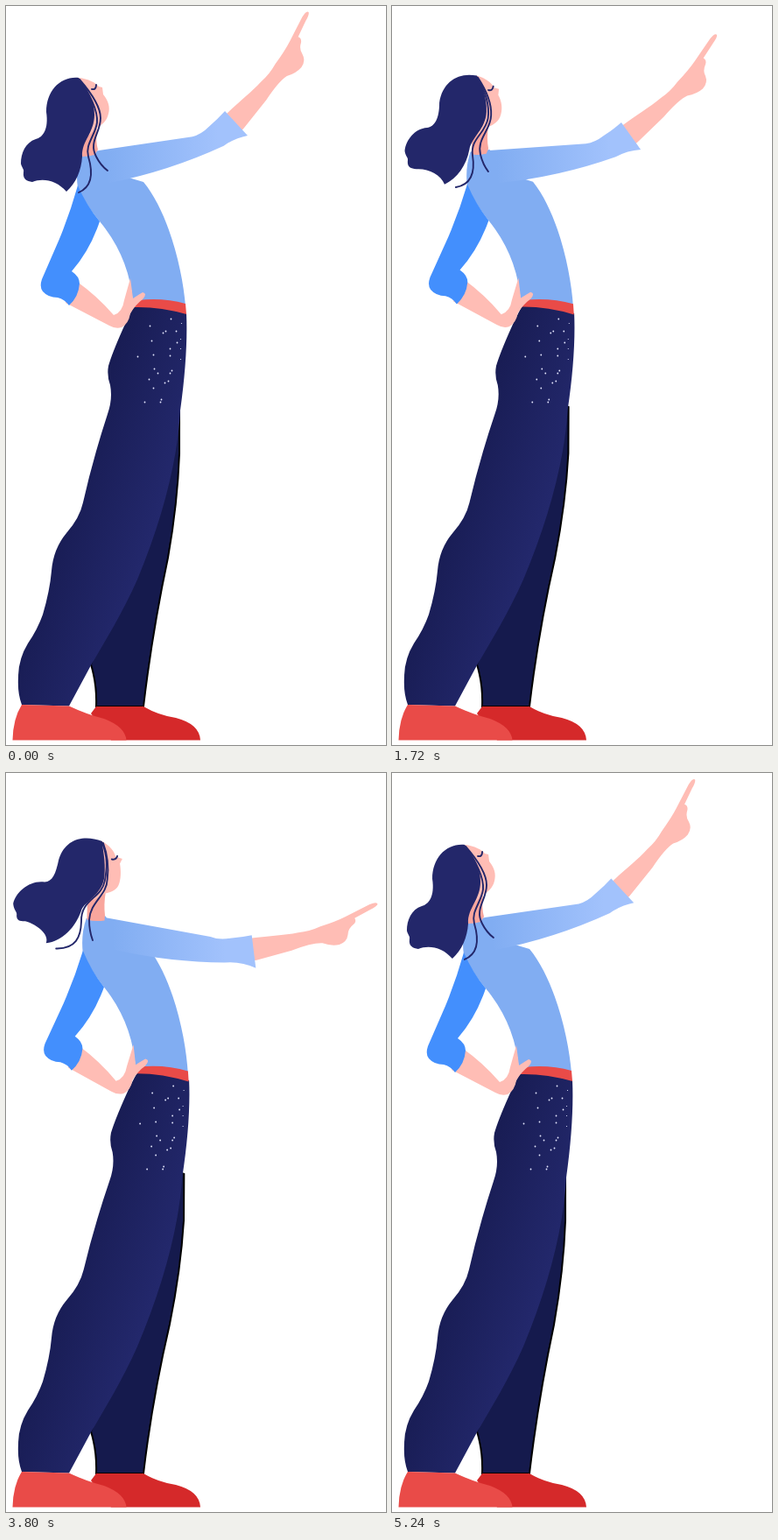
Animation, 434 px wide and 844 px high, one loop 5.28 s. Source, as an HTML page:

```html
<!DOCTYPE html>
<html lang="en">
<head>
<meta charset="utf-8">
<title>Pointing woman</title>
<style>
  html, body { margin: 0; width: 100%; height: 100%; overflow: hidden; background: #fff; }
  svg { display: block; width: 434px; height: 844px; }
  .navy { fill: #23276a; }
  .line { fill: none; stroke: #23276a; stroke-width: 1.9; stroke-linecap: round; }
  .skin { fill: #ffbdb5; }
  .red { fill: #e94b48; }
</style>
</head>
<body>
<svg viewBox="0 0 434 844">
  <defs>
    <linearGradient id="cloth" gradientUnits="userSpaceOnUse" x1="65" y1="560" x2="172" y2="595">
      <stop offset="0" stop-color="#181c53"/>
      <stop offset="1" stop-color="#23286c"/>
    </linearGradient>
    <linearGradient id="sleeveTone">
      <stop offset="0.05" stop-color="#81adf2"/>
      <stop offset="0.8" stop-color="#a2c2fc"/>
    </linearGradient>
  </defs>

  <path id="backLeg" fill="#151a4d" stroke="#000" stroke-width="2"/>
  <path id="frontLeg" fill="url(#cloth)"/>
  <g id="dots" fill="#e6e8ff"></g>
  <path fill="#d5292a" d="M103,800 L157,800 Q174,810 194,813 Q221,820 222,838.500 L120,838.500 L97,808 Z"/>
  <path class="red" d="M18,798 Q8,814 7.500,838.500 L137.500,838.500 Q136,823 112,814 Q92,809 72,799.500 Z"/>

  <g id="torso">
    <path fill="#81adf2" d="M85,168 Q79,187 82,208 Q92,228 107,246 Q141,287 145,339 L205,343 C202,303 186,236 157,201 L120,190 L107,165 Z"/>
    <path class="red" d="M151,336 Q180,333 205,340 L206,352 Q175,343 145,344 Q147,338 151,336 Z"/>
    <path class="skin" d="M80,314 Q104,331 123,353 Q133,350 135,336 L142,311 L145,334 Q151,330 156,327 Q162,328 156,335 Q148,341 142,351 Q140,363 132,367 Q125,369 118,365 L68,339 Z"/>
    <path fill="#438ffd" d="M82,205 Q73,237 61,266 L41,312 Q38,321 42,326 Q48,333 59,333 Q67,335 72,342 Q83,332 84,317 Q84,309 75,303 Q96,279 107,246 Q92,228 82,205 Z"/>
  </g>

  <path id="hand" class="skin"/>
  <path id="sleeve" fill="url(#sleeveTone)"/>

  <g id="head">
    <path id="neck" fill="#f9a69d"/>
    <path id="face" class="skin"/>
    <path id="hair" class="navy"/>
    <path id="strandA" class="line"/>
    <path id="strandB" class="line"/>
    <path id="lash" class="line"/>
  </g>
</svg>
<script>
const LOOP = 5280, STEP = 40;
const $ = id => document.getElementById(id);

// Each row: time, then one value per channel.
const swayKeys = [[0, 0], [680, 1], [1320, 0], [1980, 1], [2960, 0], [3900, 1], [4640, .5], [LOOP, 0]];
const tiltKeys = [[0, 0], [720, .14], [1720, .54], [3040, 1], [3800, 1.22], [4640, .55], [LOOP, 0]];
// cuff x, cuff y, forearm angle
const armKeys = [
  [0, 263, 134, -43], [700, 274, 133, -37], [1200, 268, 135, -47], [1720, 273, 148.5, -35.7],
  [1980, 284, 178, -22.6], [2240, 281, 176, -27], [2760, 271, 160, -35.3], [3040, 271.5, 168, -31],
  [3360, 276, 180, -22], [3800, 283, 204, -7], [3960, 284, 206, -1], [4480, 279, 168, -16],
  [4640, 276, 156.5, -27.5], [5040, 268, 141, -40.6], [LOOP, 263, 134, -43]
];

// Smooth curve through the keys, flat at turning points.
function track(keys, t, ch = 1) {
  const last = keys.length - 1;
  const slope = i => {
    if (i === 0 || i === last) return 0;
    const [a, b, c] = [keys[i - 1], keys[i], keys[i + 1]];
    const l = (b[ch] - a[ch]) / (b[0] - a[0]), r = (c[ch] - b[ch]) / (c[0] - b[0]);
    return l * r <= 0 ? 0 : 2 * l * r / (l + r);
  };
  let i = 0;
  while (i < last - 1 && t >= keys[i + 1][0]) i++;
  const a = keys[i], b = keys[i + 1], d = b[0] - a[0], u = (t - a[0]) / d, v = 1 - u;
  return a[ch] * (1 + 2 * u) * v * v + slope(i) * d * u * v * v +
         b[ch] * u * u * (3 - 2 * u) - slope(i + 1) * d * u * u * v;
}

const num = /-?\d+(\.\d+)?/g;
function mix([a, b], k) {
  const to = b.match(num);
  let i = 0;
  return a.replace(num, v => (+v + (to[i++] - v) * k).toFixed(2));
}
const shiftX = (d, fn) => d.replace(/([\d.]+),([\d.]+)/g, (_, x, y) => (+x + fn(+y)).toFixed(2) + ',' + y);
const ramp = (y, end, span) => Math.max(0, Math.min(1, (end - y) / span));

const frontLeg = 'M147,342 Q176,343 206,351 Q208,397 199,462 C196,520 178,588 150,655 ' +
  'C134,691 113,726 97,753 L72,799.5 L18,798 Q13,785 14,767 Q14,746 25,728 Q36,712 42,695 ' +
  'Q50,668 52,645 Q54,620 69,602 Q84,585 88,567 Q99,518 116,466 Q122,449 119,433 ' +
  'Q115,422 117,411 Q121,397 133,370 Q141,352 147,342 Z';
const backLeg = 'M190,455 L198,458 L198,511 Q196,568 185,630 Q167,715 157,800 L103,800 Q104,775 97,752 L120,690 Z';

// Head parts: leaning back, then upright.
const headParts = {
  neck: ['M87,150 L104,138 Q102,154 105,164 L101,170 Q94,172 87,172 Z',
         'M86,146 L106,138 Q104,152 106,164 L105,170 Q95,172 86,170 Z'],
  face: ['M83,82 C94,83 103,88 106,92 L110,93 L111,101 C117,108 119,116 117,123 C115,132 109,136 104,139 L90,152 L84,100 Z',
         'M98,80 C107,84 113,90 115,96 L122,98 L120,104 C122,110 123,119 121,126 C119,134 113,137 106,139 L92,148 L96,100 Z'],
  hair: ['M83,82 C62,80 46,97 46,121 C49,141 42,150 34,152 C22,156 17,168 17,180 C18,185 21,186 20,190 C19,198 24,200 30,201 C42,196 58,199 69,212 C80,202 86,188 87,172 C86,154 101,145 101,124 C101,107 92,94 83,82 Z',
         'M98,80 C78,74 57,80 51,105 C49,122 45,131 36,132 C20,131 6,145 4,158 C5,166 9,166 8,171 C8,177 12,178 18,178 C32,180 46,190 45,200 C62,196 76,180 81,160 C86,148 103,140 104,120 C105,102 100,90 98,80 Z'],
  strandA: ['M84,84 C98,100 108,115 108,128 C108,145 94,155 103,172 Q108,182 116,188',
            'M99,82 C106,96 109,112 108,124 C108,142 90,150 91,170 Q92,182 97,192'],
  strandB: ['M83,84 C96,100 105,120 104,133 C102,148 90,158 94,172 C100,192 97,207 83,213',
            'M98,82 C106,98 107,112 105,126 C102,146 80,148 82,172 C83,190 78,204 57,205'],
  lash: ['M98,95 Q103,96 103,90', 'M110,99 Q115,100 116,95']
};

const dots = [188,357, 164,365, 200,362, 182,371, 179,373, 166,382, 194,371, 199,380, 195,384,
  187,391, 199,391, 168,398, 150,400, 187,399, 199,403, 169,414, 173,419, 189,416, 187,419,
  163,426, 185,428, 181,430, 168,436, 177,449, 158,452, 176,452];
for (let i = 0; i < dots.length; i += 2) {
  const c = document.createElementNS('http://www.w3.org/2000/svg', 'circle');
  c.setAttribute('cx', dots[i] + .5);
  c.setAttribute('cy', dots[i + 1] + .5);
  c.setAttribute('r', dots[i] > 195 ? .6 : .9);
  $('dots').append(c);
}

$('hand').setAttribute('d', 'M-4,-15.5 C18,-16 36,-14 53,-15.4 Q66,-15 79,-19.2 Q98,-23 109,-27 ' +
  'L138,-37.5 Q147,-40 147,-36.5 Q146,-34 138,-31.5 L119,-24 Q121,-20 117,-17 Q110,-13 109,-6 ' +
  'Q107,2 98,4 Q89,5 79,0 Q68,-2 43,4 L2,10 L-4,10 Z');

function drawArm(t, s) {
  const [cx, cy, deg] = [1, 2, 3].map(ch => track(armKeys, t, ch));
  const a = deg * Math.PI / 180, cos = Math.cos(a), sin = Math.sin(a);
  const at = (u, v) => [cx + u * cos - v * sin, cy + u * sin + v * cos];
  const p = ([x, y]) => x.toFixed(2) + ',' + y.toFixed(2);
  const top = [106 + 7 * s, 165], low = [118 + 6.5 * s, 202];
  const under = at(-28, 9);
  const belly = [(under[0] + low[0]) / 2 + 2, (under[1] + low[1]) / 2 + 8];
  $('hand').setAttribute('transform', `translate(${cx} ${cy}) rotate(${deg})`);
  $('sleeve').setAttribute('d', `M${p(top)} L${p(at(-47, -23))} Q${p(at(-38, -18))} ${p(at(-25, -18.5))} ` +
    `Q${p(at(-12, -18))} ${p(at(0, -19))} L${p(at(0, 19))} Q${p(at(-13, 11))} ${p(under)} Q${p(belly)} ${p(low)} Z`);
}

function draw(t) {
  const s = track(swayKeys, t), tilt = track(tiltKeys, t);
  const lean = `translate(${3 * s} 0) rotate(${1.3 * s} 180 340)`;
  $('torso').setAttribute('transform', lean);
  $('head').setAttribute('transform', lean);
  $('dots').setAttribute('transform', `translate(${2.7 * s} 0)`);
  $('frontLeg').setAttribute('d', shiftX(frontLeg, y => 3.2 * s * ramp(y, 620, 220)));
  $('backLeg').setAttribute('d', shiftX(backLeg, y => 5.5 * s * ramp(y, 700, 200)));
  for (const id in headParts) $(id).setAttribute('d', mix(headParts[id], tilt));
  drawArm(t, s);
}

const start = performance.now();
function tick() {
  const t = (performance.now() - start) % LOOP;
  draw(Math.floor(t / STEP) * STEP);
  requestAnimationFrame(tick);
}
tick();
</script>
</body>
</html>
```
